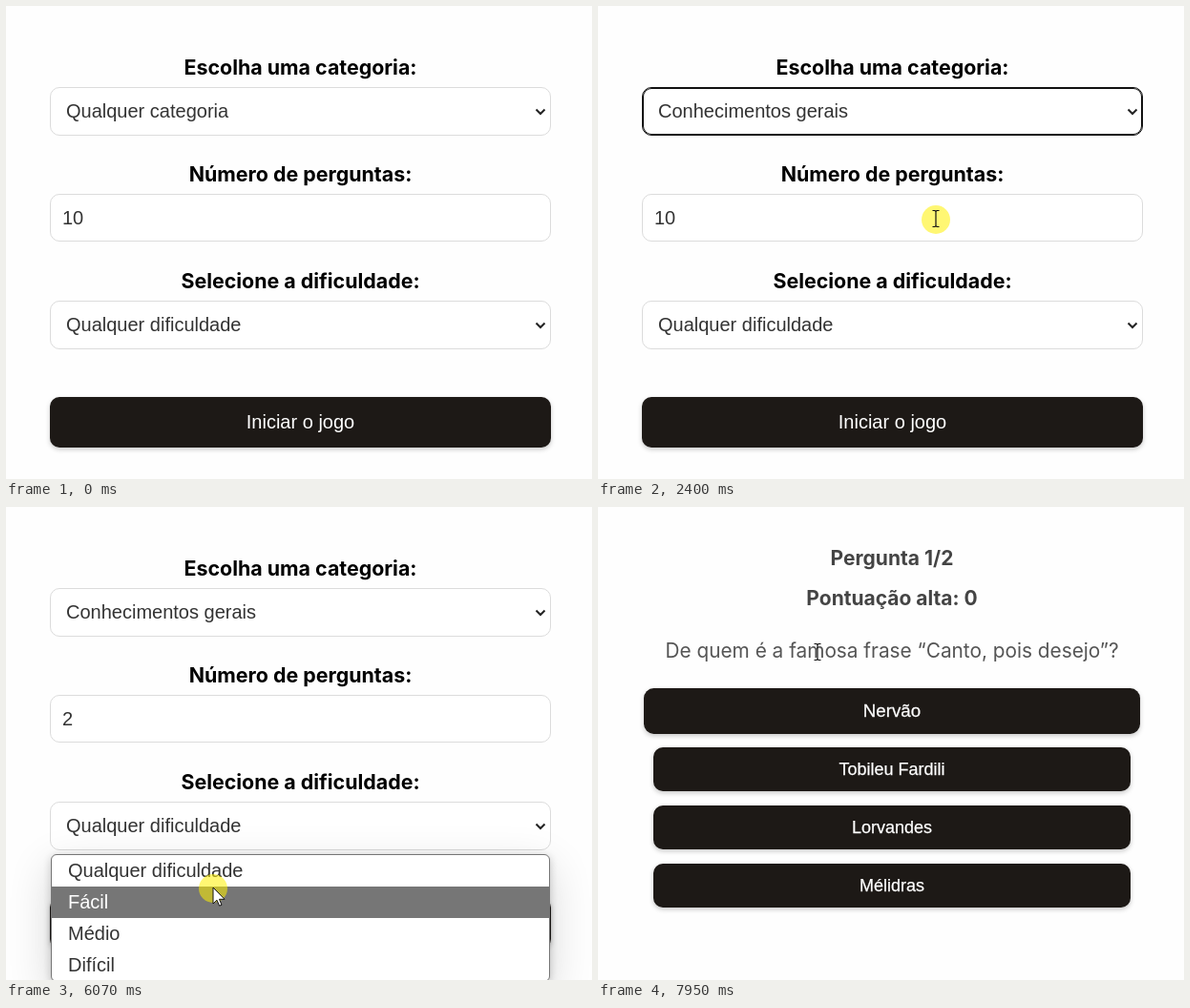
These frames come from a looping animation (614x496 px, 8000 ms). An HTML page:

```html
<!DOCTYPE html>
<html lang="pt">
<head>
<meta charset="utf-8">
<title>Quiz</title>
<style>
  html, body { margin: 0; width: 100%; height: 100%; overflow: hidden; background: #fefefe; }
  #stage { position: relative; width: 614px; height: 496px; overflow: hidden; background: #fefefe;
    font: 20px "Liberation Sans", Arial, sans-serif; color: #333; }
  #stage div { position: absolute; box-sizing: border-box; white-space: pre; }
  .title { font: 700 21.4px Inter, sans-serif; color: #000; text-align: center; }
  .quiz .title { font-size: 21px; color: #444; }
  .quiz .question { font-weight: 400; font-size: 20.8px; color: #555; }
  .field { border: 1px solid #dcdcdc; border-radius: 10px; background: #fff; padding-left: 16px; }
  .number { padding-left: 12px; }
  .focus { border-color: #111; box-shadow: inset 0 0 0 1px #111; }
  .button { border-radius: 10px; color: #fff; text-align: center; box-shadow: 0 2px 5px rgba(0,0,0,.22); }
  .answer { font-size: 18px; -webkit-text-stroke: .25px #fff; }
  .list { border: 1px solid #767676; border-radius: 6px; background: #fff; overflow: hidden;
    box-shadow: 0 2px 8px rgba(0,0,0,.2), 0 14px 46px rgba(0,0,0,.16); }
  .row { padding-left: 17px; }
  .row.on { background: #767676; color: #fff; }
  .caret { display: inline-block; height: 22px; margin-right: -1px; border-left: 1px solid #000; vertical-align: middle; }
  svg { position: absolute; inset: 0; }
</style>
</head>
<body>
<div id="stage"></div>
<script>
const LOOP = 8000;
const DARK = [29, 25, 22], TEAL = [23, 170, 194], ORANGE = [232, 74, 26];

// Moments of the clicks, in ms
const click = { openCategory: 1050, pickCategory: 1790, number: 2450, openLevel: 5110, pickLevel: 6140, start: 6940 };
const QUESTION = 7210;

// Pointer moves: leave, arrive, x, y
const moves = [
  [0, 650, 475, 172], [650, 960, 528, 131], [1270, 1390, 367, 201], [1450, 1850, 315, 186], [2130, 2190, 354, 223],
  [4850, 5000, 300, 338], [5390, 5900, 217, 399], [6220, 6450, 236, 425],
  [7100, 7270, 262, 279], [7340, 7660, 236, 229], [7890, 7950, 230, 152]
];

const stage = document.getElementById('stage');

function box(parent, cls, x, y, w, h, text = '') {
  const el = document.createElement('div');
  el.className = cls;
  el.textContent = text;
  el.style.cssText = `left:${x}px;top:${y}px;width:${w}px;height:${h}px;line-height:${h}px`;
  return parent.appendChild(el);
}

function drawing(parent, markup) {
  parent.insertAdjacentHTML('beforeend', `<svg width="614" height="496">${markup}</svg>`);
  return parent.lastElementChild;
}

// Settings form
const form = box(stage, 'form', 0, 0, 614, 496);

function field(label, cls, y, h) {
  box(form, 'title', 46, y - 37, 525, 32, label);
  const el = box(form, 'field ' + cls, 46, y, 525, h);
  el.style.lineHeight = h - 2 + 'px';
  return el;
}
const fields = {
  category: field('Escolha uma categoria:', '', 85, 51),
  number: field('Número de perguntas:', 'number', 197, 50),
  level: field('Selecione a dificuldade:', '', 309, 51)
};
const start = box(form, 'button', 46, 410, 525, 53, 'Iniciar o jogo');
const chevron = y => `<path d="M555.5 ${y}l4.5 4.5 4.5-4.5" fill="none" stroke="#222" stroke-width="2"/>`;
drawing(form, chevron(108.5) + chevron(332.5));
const spinner = drawing(form, '<path d="M543 220l4.5-7 4.5 7zM543 225l4.5 7 4.5-7z" fill="#7b7b7b"/>');

// Drop-down lists
function list(y, h, rowWidth, names) {
  const el = box(form, 'list', 47, y, 523, h);
  const rows = names.map((name, i) => box(el, 'row', 0, i * 33, rowWidth, 33, name));
  return { el, rows, y };
}
const categories = list(140, 400, 503, ['Qualquer categoria', 'Conhecimentos gerais',
  ...['Livros', 'Filmes', 'Músicas', 'Musicais e teatro', 'Televisão', 'Videogame', 'Jogos de tabuleiro']
    .map(name => 'Entretenimento: ' + name),
  'Ciência e natureza', 'Ciência: Computadores']);
drawing(categories.el, `<path d="M507 19l5.5-8 5.5 8z" fill="#8b8b8b" stroke="#8b8b8b" stroke-linejoin="round"/>
  <rect x="507" y="29" width="11" height="400" rx="5.5" fill="#8b8b8b"/>`);
const levels = list(364, 134, 521, ['Qualquer dificuldade', 'Fácil', 'Médio', 'Difícil']);

// Question page
const quiz = box(stage, 'quiz', 0, 0, 614, 496);
box(quiz, 'title', 8, 38, 600, 32, 'Pergunta 1/2');
box(quiz, 'title', 8, 80, 600, 32, 'Pontuação alta: 0');
box(quiz, 'title question', 8, 135, 600, 32, 'De quem é a famosa frase “Canto, pois desejo”?');
const answers = ['Nervão', 'Tobileu Fardili', 'Lorvandes', 'Mélidras']
  .map((name, i) => box(quiz, 'button answer', 58, 191 + 61 * i, 500, 46, name));

// Pointer
const pointer = drawing(stage, `<g>
  <circle cy="1" r="15" fill="#fff000" fill-opacity=".55"/>
  <path class="arrow" d="M0 0V17L4 13.2 6.6 19.2 9 18.2 6.5 12.3H12Z" fill="#fff" stroke="#111"/>
  <g class="hand" stroke="#111" stroke-linejoin="round"><path fill="#fff" d="M-2 1.5Q0-1.5 2 1.5V7.5Q5 6.5 5.5 8.8
    8 8 8.5 10.2 11 9.5 11 12V16Q10.5 19.5 9 22H0L-5.5 14.5Q-7.5 11.5-4.5 11.5L-2 13.5Z"/>
    <path fill="none" d="M2 7.5v4M5.5 9v3M8.5 10.5v2.5"/></g>
  <path class="beam" d="M-3.5-8.5H-1L0-7.5 1-8.5H3.5M0-7.5V7.5M-3.5 8.5H-1L0 7.5 1 8.5H3.5" fill="none" stroke="#111" stroke-width="1.2"/>
</g>`).firstElementChild;
const halo = pointer.querySelector('circle');

const ramp = (t, from, ms) => Math.min(1, Math.max(0, (t - from) / ms));
const between = (t, from, to) => t >= from && t < to;
const toggle = (el, visible) => { el.style.display = visible ? '' : 'none'; };

function pointerAt(t) {
  let [, , x, y] = moves[0];
  for (const [leave, arrive, toX, toY] of moves) {
    const p = ramp(t, leave, arrive - leave);
    x += (toX - x) * p;
    y += (toY - y) * p;
  }
  return [x, y];
}

function pointerKind(t, y, listOpen) {
  if (t < 650) return '';
  if (t >= QUESTION) return y < 185 ? 'beam' : 'hand';
  if (listOpen || t >= click.start) return 'arrow';
  if (y >= 410) return 'hand';
  return between(y, 197, 247) ? 'beam' : 'arrow';
}

function focusAt(t) {
  if (between(t, click.pickCategory, click.number)) return 'category';
  if (between(t, click.number, click.openLevel)) return 'number';
  if (between(t, click.pickLevel, click.start - 60)) return 'level';
}

// "10" is deleted digit by digit, then "2" is typed
function numberAt(t) {
  if (t >= 4450) return '2';
  return '10'.slice(0, 2 - Math.floor(2 * ramp(t, 3590, 260)));
}

// The pointer sweeps upwards over the answers and rests on the first
function answerHover(t, i) {
  if (i === 3) return 0;
  const enter = 7480 - 135 * i;
  const leave = i === 0 ? 7890 : enter + 135;
  return ramp(t, enter, 60) - ramp(t, leave, 60);
}

function paint(el, tint, amount, scale) {
  el.style.background = `rgb(${DARK.map((v, i) => Math.round(v + (tint[i] - v) * amount))})`;
  el.style.transform = `scale(${scale})`;
}

function drawList(menu, open, y) {
  menu.el.style.opacity = open;
  const current = Math.max(0, Math.floor((y - menu.y - 1) / 33));
  menu.rows.forEach((row, i) => row.classList.toggle('on', i === current));
}

function render(t) {
  const [x, y] = pointerAt(t);
  const focused = focusAt(t);
  toggle(form, t < click.start);
  toggle(quiz, t >= QUESTION);

  for (const name in fields) fields[name].classList.toggle('focus', name === focused);
  fields.category.textContent = t < click.pickCategory ? 'Qualquer categoria' : 'Conhecimentos gerais';
  fields.level.textContent = t < click.pickLevel ? 'Qualquer dificuldade' : 'Fácil';
  const caret = focused === 'number' && Math.floor((t - 2420) / 500) % 2 === 0;
  fields.number.innerHTML = numberAt(t) + (caret ? '<span class="caret"></span>' : '');
  toggle(spinner, focused === 'number');

  const categoryOpen = t < click.pickCategory ? ramp(t, click.openCategory, 70) : 0;
  const levelOpen = t < click.pickLevel ? ramp(t, click.openLevel, 70) : 0;
  drawList(categories, categoryOpen, y);
  drawList(levels, levelOpen, y);

  const hover = ramp(t, 6270, 330);
  paint(start, TEAL, hover, 1 + .05 * hover);
  answers.forEach((el, i) => paint(el, ORANGE, answerHover(t, i), 1 + .04 * answerHover(t - 110, i)));

  const kind = pointerKind(t, y, categoryOpen || levelOpen);
  pointer.setAttribute('transform', `translate(${x} ${y})`);
  for (const name of ['arrow', 'hand', 'beam']) toggle(pointer.querySelector('.' + name), name === kind);
  toggle(halo, Object.values(click).some(moment => between(t, moment - 70, moment)));
}

const begin = performance.now();
function tick(now) {
  render(Math.max(0, now - begin) % LOOP);
  requestAnimationFrame(tick);
}
render(0);
requestAnimationFrame(tick);
</script>
</body>
</html>
```
